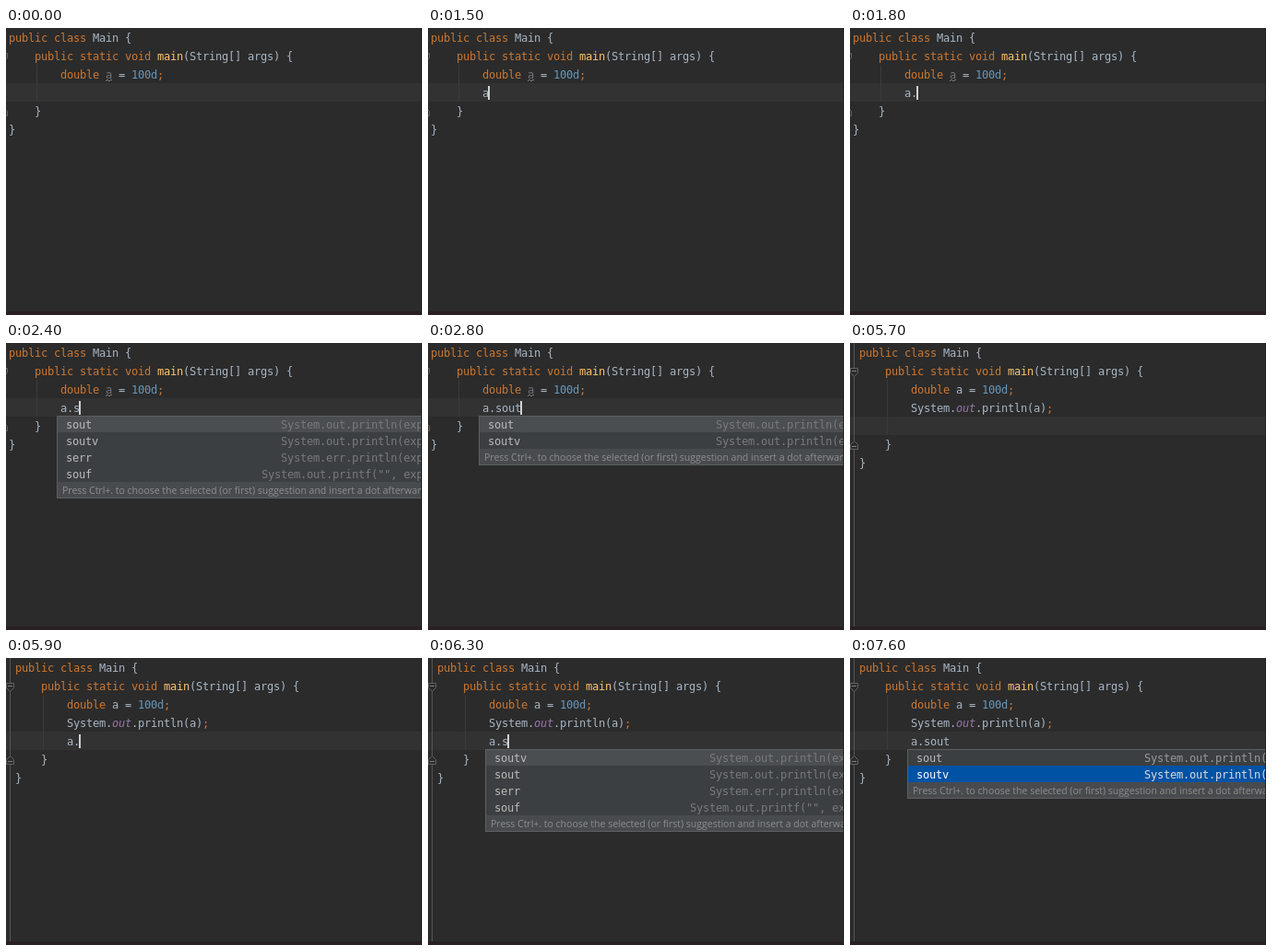
Write an HTML page that moves like this. It is 451x312 px and loops after 8000 ms.

```html
<!DOCTYPE html>
<html lang="en">
<head>
<meta charset="utf-8">
<title>Postfix completion</title>
<style>
html, body { margin: 0; width: 451px; height: 312px; overflow: hidden; background: #2b2b2b; }
svg { display: block; font: 12px "DejaVu Sans Mono", monospace; }
.hint { font: 10.5px "Open Sans", "Noto Sans", sans-serif; }
</style>
</head>
<body>
<svg id="stage" width="451" height="312"></svg>
<script>
const LOOP = 8000, CHAR = 7, LINE = 20, ROW = 18;
const HINT = 'Press Ctrl+. to choose the selected (or first) suggestion and insert a dot afterwards';

const details = {
  a: 'double', args: 'String[]', abstract: '', assert: '',
  sout: 'System.out.println(expr)', soutv: 'System.out.println(expr)',
  serr: 'System.err.println(expr)', souf: 'System.out.printf("", expr)',
  arg: 'functionCall(expr)', cast: '((SomeType) expr)', castvar: 'T name = (SomeType) expr',
  field: 'myField = expr', format: 'String.format(expr)', par: '(expr)',
  return: 'return expr', var: 'T name = expr'
};
const names = 'a args abstract assert'.split(' ');
const all = 'arg cast castvar field format par return serr souf sout soutv var'.split(' ');

// start time, typed text, caret visible, popup items, focused item
const scenes = [
  [0, '', 0],
  [600, '', 1],
  [1500, 'a', 1],
  [1600, 'a', 1, names],
  [1800, 'a.', 1],
  [1900, 'a.', 1, all],
  [2400, 'a.s', 1, ['sout', 'soutv', 'serr', 'souf']],
  [2600, 'a.so', 1, ['sout', 'soutv', 'souf']],
  [2700, 'a.sou', 1, ['sout', 'soutv', 'souf']],
  [2800, 'a.sout', 1, ['sout', 'soutv']],
  [3400, 'a.sout', 0, ['sout', 'soutv']],
  [3800, 'a.sout', 1],
  [3900, 'System.out.println(a);', 1],
  [4700, 'System.out.println(a);', 0],
  [5000, '', 1],
  [5700, '', 0],
  [5800, 'a', 1, names],
  [5900, 'a.', 1],
  [6000, 'a.', 1, all],
  [6200, 'a.s', 1, all],
  [6300, 'a.s', 1, ['soutv', 'sout', 'serr', 'souf']],
  [6700, 'a.so', 1, ['soutv', 'sout', 'souf']],
  [6800, 'a.sou', 1, ['soutv', 'sout', 'souf']],
  [6900, 'a.sout', 1, ['sout', 'soutv']],
  [7500, 'a.sout', 0, ['sout', 'soutv']],
  [7600, 'a.sout', 0, ['sout', 'soutv'], 1]
];

const rect = (x, y, w, h, fill, more = '') =>
  `<rect x="${x}" y="${y}" width="${w}" height="${h}" fill="${fill}" ${more}/>`;
const path = (d, stroke) => `<path d="${d}" fill="none" stroke="${stroke}"/>`;

// Monospaced text on the editor's character grid
const text = (s, x, y, fill, more = '') =>
  `<text x="${[...s].map((_, i) => x + i * CHAR).join(' ')}" y="${y}" fill="${fill}" ${more}>${s}</text>`;

function colour(token, unused) {
  if (/^(public|class|static|void|double|;)$/.test(token)) return '#cc7832';
  if (token === 'main') return '#ffc66d';
  if (/^\d/.test(token)) return '#6897bb';
  return unused && token === 'a' ? '#72737a' : '#a9b7c6';
}

function codeLine(line, row, resolved) {
  let out = '';
  for (const m of line.matchAll(/\w+|\S/g)) {
    const field = resolved && m[0] === 'out';
    out += text(m[0], 10 + m.index * CHAR, row * LINE + 15,
      field ? '#9876aa' : colour(m[0], row === 2 && !resolved),
      field ? 'font-style="italic"' : '');
  }
  return out;
}

function foldMarks(endRow) {
  const y = endRow * LINE;
  return path('M4.5 0V312', '#555')
    + `<g fill="#2b2b2b" stroke="#606366"><path d="M.5 27.5h8v5l-4 4-4-4z"/>`
    + `<path d="M.5 ${y + 15.5}h8v-5l-4-4-4 4z"/></g>`
    + path(`M2 30.5h5M2 ${y + 12.5}h5`, '#808080');
}

function popup(items, focus, row) {
  const x = items === names ? 28 : 62, y = row * LINE + 19;
  const h = Math.min(items.length, 11.5) * ROW;
  const right = x + (items.length === 2 ? 425 : 411);
  const textX = items === names ? 66 : x + 10;
  let out = rect(x, y, 470, h + ROW, '#3c3f41');
  items.forEach((name, i) => {
    const top = y + i * ROW, on = i === focus;
    if (on) out += rect(x, top, 470, ROW, '#0052a4');
    else if (!i && focus === undefined) out += rect(x, top, 470, ROW, '#4b4e50');
    if (items === names && details[name])
      out += `<circle cx="${x + 14}" cy="${top + 9}" r="6" fill="#b9875a"/>`;
    const info = details[name];
    out += text(name, textX, top + 14, on ? '#fff' : '#bbb')
      + text(info, right - info.length * CHAR, top + 14,
        on ? '#ddd' : focus === undefined ? '#787a7b' : '#999');
  });
  return out + rect(x, y + h, 470, ROW, '#484b4d')
    + `<text class="hint" x="${x + 6}" y="${y + h + 13}" fill="#8c8e8f">${HINT}</text>`
    + rect(x + .5, y + .5, 470, h + ROW - 1, 'none', 'stroke="#5c5f61"');
}

function draw(t) {
  const [, typed, caret, items, focus] = scenes.findLast(s => s[0] <= t);
  const resolved = t >= 4200, second = t >= 5000;
  const row = second ? 4 : 3;
  const lines = ['public class Main {', '    public static void main(String[] args) {', '        double a = 100d;'];
  if (second) lines.push('        System.out.println(a);');
  lines.push('        ' + typed, '    }', '}');

  let out = rect(0, row * LINE, 451, LINE, '#323232');
  out += `<g transform="translate(${t < 5100 ? -7 : 0})">`
    + foldMarks(row + 1)
    + path(`M40.5 40V${(row + 1) * LINE}`, '#3b3b3b')
    + lines.map((line, i) => codeLine(line, i, resolved)).join('');
  if (!resolved) out += path('M115 58l2-2 2 2 2-2 1 1', '#808080');
  if (caret) out += rect(65 + typed.length * CHAR, row * LINE + 3, 2, 15, '#d0d0d0');
  if (items) out += popup(items, focus, row);
  return out + '</g>' + rect(0, 308, 451, 4, '#2a2024') + rect(450, 0, 1, 312, '#242424');
}

let shown;
function frame(now) {
  const picture = draw(now % LOOP);
  if (picture !== shown) stage.innerHTML = shown = picture;
  requestAnimationFrame(frame);
}
frame(performance.now());
</script>
</body>
</html>
```
